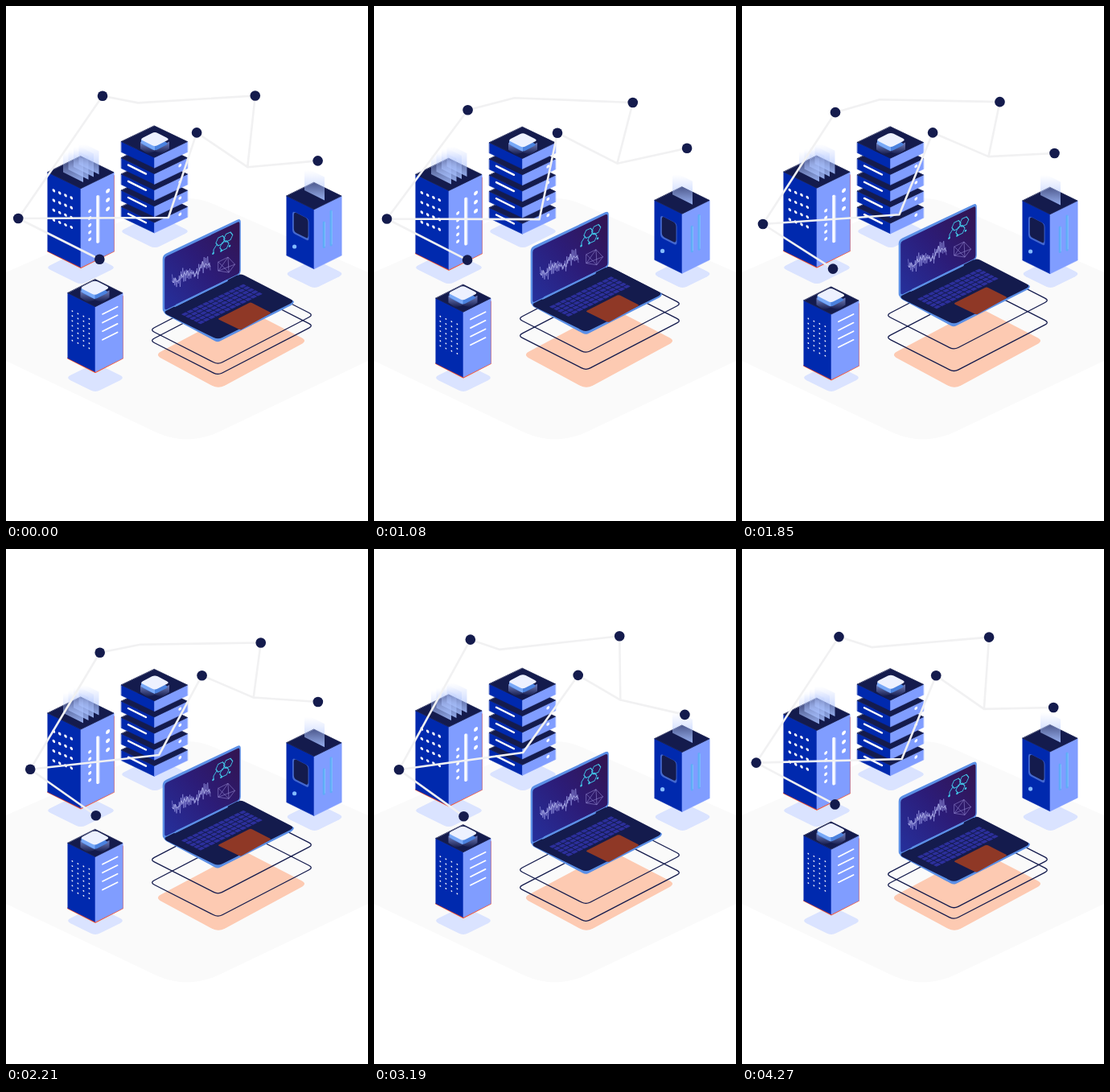
Write an HTML page that moves like this. It is 450 by 640 pixels and loops after 4320 ms.

```html
<!DOCTYPE html>
<html lang="en">
<head>
<meta charset="utf-8">
<title>Isometric data network</title>
<style>
  html, body { margin: 0; width: 100%; height: 100%; overflow: hidden; background: #fff; }
  svg { display: block; width: 450px; height: 640px; }
</style>
</head>
<body>
<svg id="stage" viewBox="0 0 450 640" stroke-linejoin="round" stroke-linecap="round">
  <defs>
    <linearGradient id="sheet" x1="0" y1="0" x2="0" y2="1">
      <stop offset=".1" stop-color="#b9caff" stop-opacity="0"/>
      <stop offset="1" stop-color="#a3beff" stop-opacity=".9"/>
    </linearGradient>
    <linearGradient id="halo" x1="0" y1="0" x2="0" y2="1">
      <stop offset="0" stop-color="#a9b9ff" stop-opacity=".65"/>
      <stop offset="1" stop-color="#a9b9ff" stop-opacity="0"/>
    </linearGradient>
    <linearGradient id="screen" x1="0" y1="1" x2="1" y2="0">
      <stop offset="0" stop-color="#25309c"/>
      <stop offset=".5" stop-color="#2c1c78"/>
      <stop offset="1" stop-color="#33144f"/>
    </linearGradient>
  </defs>
</svg>
<script>
const NAVY = '#141b4d', BLUE = '#0029ae', LIGHT = '#809dff', WHITE = '#fff';
const EDGE = '#5b8fe6', CYAN = '#43c9ea', GLOW = '#ff5226';
const stage = document.getElementById('stage');

// ---- drawing helpers ----
const path = (d, fill, extra = '') => `<path d="${d}" fill="${fill}" ${extra}/>`;
const line = (d, color, width) => path(d, 'none', `stroke="${color}" stroke-width="${width}"`);
const poly = (points, fill, stroke = 0, color = fill) =>
  `<polygon points="${points}" fill="${fill}" stroke="${color}" stroke-width="${stroke}"/>`;
const circle = (x, y, r, fill) => `<circle cx="${x}" cy="${y}" r="${r}" fill="${fill}"/>`;
const repeat = (n, draw) => Array.from({ length: n }, (_, i) => draw(i)).join('');
const dot = (x, y, r, skew) =>
  `<circle r="${r}" fill="#fff" transform="translate(${x} ${y}) skewY(${skew})"/>`;

function rounded(points, cut) {
  const toward = ([x, y], [u, v]) => {
    const k = cut / Math.hypot(u - x, v - y);
    return [x + (u - x) * k, y + (v - y) * k];
  };
  const n = points.length;
  return points.map((p, i) =>
    `${i ? 'L' : 'M'}${toward(p, points[(i + n - 1) % n])}Q${p} ${toward(p, points[(i + 1) % n])}`
  ).join('') + 'Z';
}

const diamond = (cx, cy, w, h) => [[cx - w, cy], [cx, cy + h], [cx + w, cy], [cx, cy - h]];

// Isometric block whose back corner sits at (0, y)
const box = (y, w, h, tall) =>
  poly([-w, y + h, 0, y + 2 * h, 0, y + 2 * h + tall, -w, y + h + tall], BLUE, .6) +
  poly([w, y + h, 0, y + 2 * h, 0, y + 2 * h + tall, w, y + h + tall], LIGHT, .6) +
  poly(diamond(0, y + h, w, h), NAVY, .8);

const rim = (w, h, tall) =>
  line(`M${-w} ${h + tall}L0 ${2 * h + tall + .5}L${w} ${h + tall}V${h + 4}`, GLOW, 1.7);

const shadow = (cx, cy, w, h) => path(rounded(diamond(cx, cy, w + 3, h + 1.5), 7), '#dae3ff');

const sheet = (x, y) => path(`M${x} ${y}l25 12.5v-29l-25 -12.5z`, 'url(#sheet)');

const chip = (cx, cy) =>
  path(`M${cx - 18} ${cy + 3}l18 9 18-9v9l-9 6-9-3-9 3-9-6z`, 'url(#halo)') +
  path(rounded(diamond(cx, cy + 5.5, 17.5, 9), 4), '#4b82df') +
  path(`M${cx - 17} ${cy}v5l17 9v-6z`, '#78a8f7') +
  path(rounded(diamond(cx, cy, 18.5, 9.4), 4), '#edf1ff');

// ---- scenery ----
const ground =
  path('M0 331L190 247Q225 231 260 247L450 331V441L263 530Q225 547 187 530L0 441Z', '#fafafa') +
  shadow(93, 325, 41, 20) + shadow(185, 280, 41, 20) +
  shadow(111, 462, 34, 17) + shadow(383.5, 333, 34, 17) +
  path(rounded([[185, 433.5], [264, 476], [375, 416], [295, 375]], 9), '#fdcab2');

const ring = line(rounded([[179, -41], [263.5, 2], [382, -59.5], [297.5, -102.5]], 6), NAVY, 1.3);

const stack = repeat(5, i => {
  const k = 4 - i, y = 20.2 * k;
  const front = k ? line(`M-32.5 ${y + 28.4}l22 11`, WHITE, 2.4) + dot(31.8, y + 29, 1.9, -26) : '';
  return box(y, 41, 19.6, 13) + front;
}) + chip(.5, 16.5);

const bigTower = rim(41, 20, 98) + box(0, 41, 20, 98) +
  repeat(16, i => {
    const c = i % 4, r = i >> 2;
    return dot(-33.6 + 7.3 * c, 42.6 + 3 * c + 12.2 * r, 1.8, 26);
  }) +
  repeat(5, i => dot(11.2, 68 + 8.8 * i, 2, -28)) +
  repeat(3, i => dot(33.6, 43 + 11.2 * i, 2.5, -28)) +
  line('M21.8 50V106', '#c9d6ff', 3.6) + line('M20.8 50V106.5', WHITE, 3) +
  repeat(4, i => sheet(-22 + 6.5 * i, 19.6 - 3.2 * i));

const smallTower = rim(34, 17, 81) + box(0, 34, 17, 81) +
  repeat(28, i => {
    const c = i % 4, r = i >> 2;
    return dot(-28.6 + 7 * c, 39.5 + 3.2 * c + 6.1 * r, .9, 26);
  }) +
  repeat(4, i => line(`M9 ${43.3 + 10.6 * i}l18.6 -9.3`, WHITE, 1.7)) +
  chip(-.5, 10.5);

const slot = (x, top, bottom) =>
  line(`M${x} ${top}V${bottom}`, '#5eacf7', 3) + line(`M${x + 1.2} ${top}V${bottom - 1}`, '#86c9ff', .8);

const cabinet = box(0, 34, 16.7, 74) +
  path(rounded([[-27, 35], [-6.5, 45.5], [-6.5, 73], [-27, 62.5]], 4), '#4468cf') +
  path(rounded([[-25.2, 36], [-7.4, 45.2], [-7.4, 70], [-25.2, 61]], 4), NAVY) +
  circle(-24.4, 79.6, 2.6, '#84bbff') +
  slot(12.2, 49.5, 80) + slot(21, 35.5, 77.5) + sheet(-12, 9.5);

// ---- laptop ----
const random = seed => {
  const s = Math.sin(seed * 12.9898) * 43758.5453;
  return s - Math.floor(s);
};

// Zigzag signal around a rising baseline
const signal = (n, size, seed) => 'M' + Array.from({ length: n }, (_, i) => {
  const k = i / (n - 1), swing = (i % 2 ? 1 : -1) * size * random(i + seed);
  return `${206.5 + 47.5 * k} ${343 - 23 * k + 2.5 * Math.sin(k * 13) + swing}`;
}).join('L');

const hex = (x, y) => poly(Array.from({ length: 6 }, (_, i) => {
  const a = i * Math.PI / 3;
  return [x + 5.6 * Math.cos(a), y + 5.6 * Math.sin(a)];
}), 'none', 1, CYAN);

const molecule = `<g transform="matrix(1 -.48 0 1 270 293)">
  ${hex(6.2, -3)}${hex(-3.5, -3)}${hex(1.4, 5.4)}
  ${line('M-8.4 0L-12 4V8.5', CYAN, 1)}
  ${circle(-12.5, 8.4, 1.3, CYAN)}${circle(-2.5, 10, 1.3, CYAN)}${circle(8, 9, 1.3, CYAN)}</g>`;

const crystal = line('M264 318L276 312L284.5 321L277 331L264 329ZL277 331L276 312L264 329L284.5 321', '#9b8fd8', .55);

const keys = `<g transform="matrix(6.5 -3.17 5 2.55 217 383)">${repeat(60, i =>
  `<rect x="${i % 12 + .06}" y="${Math.floor(i / 12) + .09}" width=".86" height=".8" rx=".12" fill="#2c2f9b"/>`)}</g>`;

const laptop =
  path(rounded([[196, 382], [263, 418], [358, 370], [358, 365], [196, 378]], 4), EDGE) +
  path(rounded([[195, 381], [263.5, 414.6], [359, 367], [291, 332]], 6), NAVY) +
  path(rounded([[194.7, 309.5], [291.8, 263.5], [291.8, 333.5], [194.7, 381.5]], 5), EDGE) +
  path(rounded([[197.2, 312], [290.4, 267.3], [290.4, 332], [197.2, 378.2]], 3), 'url(#screen)') +
  line('M212 371.6L274.5 341.2', EDGE, 2.2) +
  line('M277 341L288 335.6M199 380L209 375', NAVY, 2.5) +
  line(signal(44, 10, 1), '#9a9ae6', .6) + line(signal(26, 7, 60), '#cfd4ff', .6) +
  molecule + crystal + keys +
  path(rounded([[263, 388.7], [304, 368], [330, 381.2], [291.5, 402.6]], 2), '#8f3826');

// ---- motion: each part swings along (dx, dy), furthest out at the angle peak ----
const LOOP = 4320, PERIOD = 4500;
const part = (x, y, dx, dy, peak, body = '') => ({ x, y, dx, dy, peak, body });
const node = (...swing) => part(...swing, circle(0, 0, 6.3, NAVY));

const blocks = [
  part(184.5, 149.2, 0, 1.1, 100, stack),
  part(93, 185.3, 0, 4.3, 70, bigTower),
  part(111, 344, 0, 5, 150, smallTower),
  part(383, 221.7, 0, 4, 125, cabinet),
  part(0, 456.3, 0, 5.7, 275, ring),
  part(0, 435.5, 0, 10.3, 321, ring),
  part(0, -10.3, 0, 10.4, 2, laptop)
];
const net = {
  a: node(118.4, 120, -2.5, 12.8, 130),
  b: node(313, 113.8, 9.5, 6.8, 110),
  c: node(240.7, 157.3, 13, -.4, 254),
  d: node(387.7, 191.6, -1.4, 15, 273),
  e: node(22.9, 269, 10, 6.5, 220),
  f: node(114, 323.2, -3, 11, 220),
  p: part(165.2, 119.7, 9.6, -5.6, 97),
  q: part(304, 192.3, 4, -8.4, 200),
  r: part(195.8, 259.3, 11.2, 6.7, 57)
};
const parts = [...blocks, ...Object.values(net)];

const group = p => `<g>${p.body}</g>`;
stage.insertAdjacentHTML('beforeend', ground + blocks.map(group).join('') +
  '<path id="links" fill="none" stroke="#f1f1f2" stroke-width="2.6"/>' +
  Object.values(net).map(group).join(''));

const links = document.getElementById('links');
const groups = [...stage.children].filter(el => el.tagName === 'g');

function render(now) {
  const turn = now % LOOP / PERIOD * 360;
  parts.forEach((p, i) => {
    const swing = Math.cos((turn - p.peak) * Math.PI / 180);
    p.at = [p.x + p.dx * swing, p.y + p.dy * swing];
    groups[i].setAttribute('transform', `translate(${p.at})`);
  });
  const trace = ids => 'M' + [...ids].map(id => net[id].at).join('L');
  links.setAttribute('d', trace('feapbqd') + trace('qcre'));
}

const start = performance.now();
function tick() {
  render(performance.now() - start);
  requestAnimationFrame(tick);
}
tick();
</script>
</body>
</html>
```
